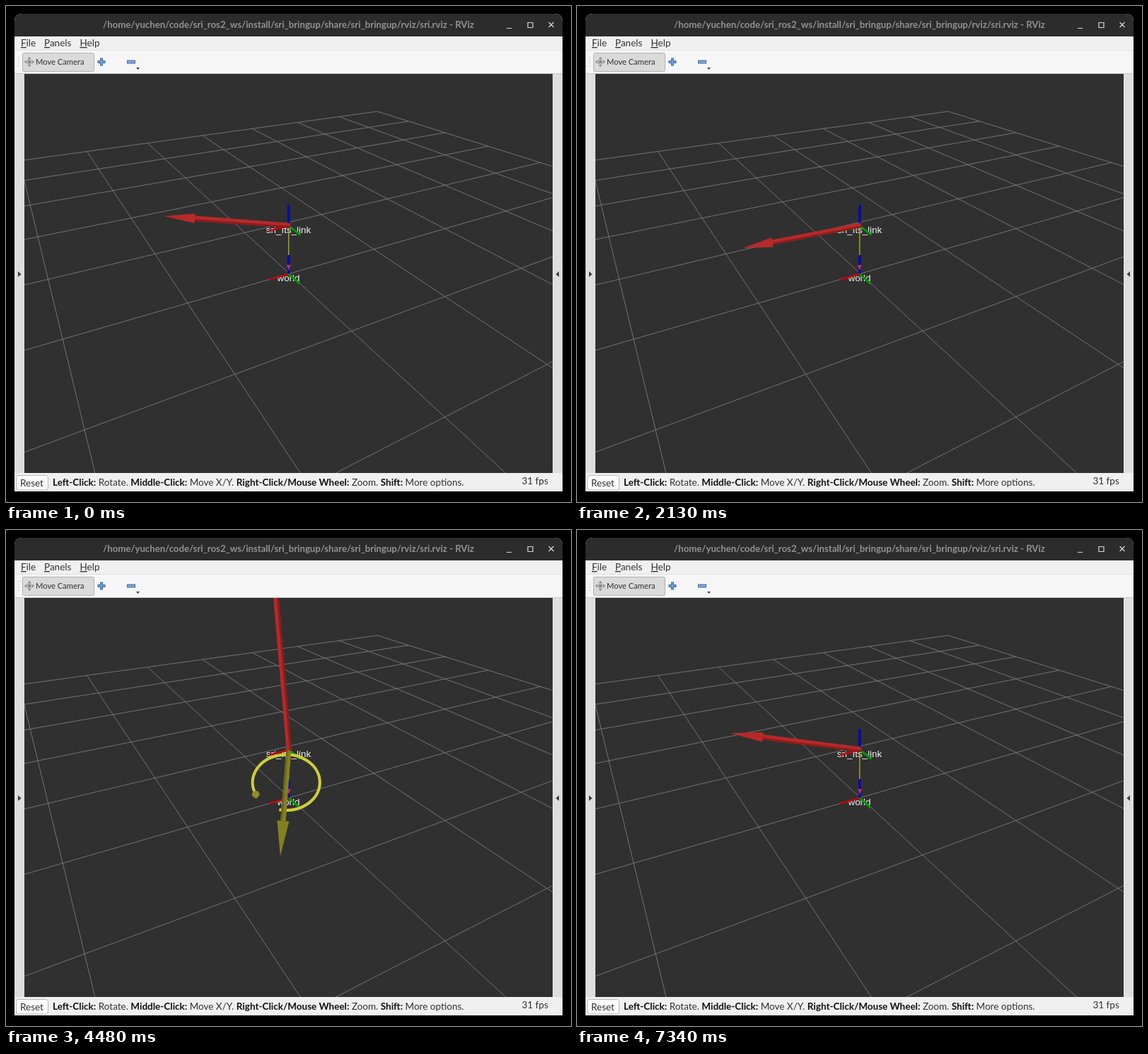
An HTML page that plays this animation: 799 px wide and 701 px high, repeating every 7380 ms.

```html
<!DOCTYPE html>
<html lang="en">
<head>
<meta charset="utf-8">
<title>Wrench display</title>
<style>
  html, body { margin: 0; width: 100%; height: 100%; overflow: hidden; background: #000; }
  svg { display: block; }
  text { font: 13.5px Lato, "Open Sans", sans-serif; fill: #303030; white-space: pre; }
  .b { font-weight: 700; fill: #111; }
  .title { font-size: 13.2px; font-weight: 700; fill: #929292; text-anchor: middle; }
  .tag { font: 13.4px "Liberation Sans", Arial, sans-serif; fill: #f2f2f2; text-anchor: middle; }
  .u { text-decoration: underline; }
  #grid { stroke: #7b7b7b; stroke-width: .9; fill: none; }
</style>
</head>
<body>
<svg width="799" height="701" viewBox="0 0 799 701">
  <defs><clipPath id="view"><rect x="26" y="96" width="747" height="564"/></clipPath></defs>
  <rect width="799" height="701"/>

  <!-- window and title bar -->
  <path d="M12 686V22Q12 11 23 11H776Q787 11 787 22V686Z" fill="#f0f0f0"/>
  <path d="M12 43V22Q12 11 23 11H776Q787 11 787 22V43Z" fill="#2c2c2c"/>
  <text class="title" x="399.5" y="31">/home/yuchen/code/sri_ros2_ws/install/sri_bringup/share/sri_bringup/rviz/sri.rviz - RViz</text>
  <path d="M708 31.5H715M738 23.5H745V30.5H738ZM767.5 23L774.5 30M774.5 23L767.5 30" fill="none" stroke="#d8d8d8" stroke-width="1.2"/>

  <!-- menu and toolbar -->
  <text x="21" y="57"><tspan class="u">F</tspan>ile</text>
  <text x="54" y="57"><tspan class="u">P</tspan>anels</text>
  <text x="104.5" y="57"><tspan class="u">H</tspan>elp</text>
  <rect x="12" y="62" width="775" height="33" fill="#f6f6f6"/>
  <path d="M12 62.5H787" stroke="#e0e0e0"/>
  <path d="M12 95.5H787" stroke="#c8c8c8"/>
  <path d="M18 72V88" stroke="#c4c4c4" stroke-width="2" stroke-dasharray="1 3"/>
  <rect x="23.5" y="66.5" width="101" height="26" rx="2" fill="#dadada" stroke="#b2b2b2"/>
  <path d="M33 73V85M27 79H39M31 75L33 72.5L35 75M31 83L33 85.5L35 83M29 77L26.5 79L29 81M37 77L39.5 79L37 81M30 76L36 82M36 76L30 82" fill="none" stroke="#777"/>
  <text x="42" y="83" style="font-size:11.2px">Move Camera</text>
  <path d="M135 73.5V84.5M129.5 79H140.5" stroke="#3e6fa8" stroke-width="4"/>
  <path d="M135 74.5V83.5M130.5 79H139.5" stroke="#7fa8d8" stroke-width="1.5"/>
  <rect x="171.5" y="77" width="11" height="4" fill="#7fa8d8" stroke="#3e6fa8"/>
  <path d="M184 87H189L186.5 90Z" fill="#444"/>

  <!-- side handles -->
  <path d="M12 96H26V660H12ZM773 96H787V660H773Z" fill="#dedede"/>
  <path d="M17 375L21.5 379L17 383ZM782 375L777.5 379L782 383Z" fill="#3c3c3c"/>

  <!-- 3D view -->
  <rect x="26" y="96" width="747" height="564" fill="#303030"/>
  <g clip-path="url(#view)">
    <path id="grid"/>
    <text class="tag" x="399.5" y="320.5">sri_fts_link</text>
    <text class="tag" x="399.5" y="388.5">world</text>
    <g fill="none" stroke-width="3">
      <path d="M399.7 312V352" stroke="#a3a026" stroke-width="1.5"/>
      <path d="M399.7 281V310M399.7 352V379" stroke="#0808b4" stroke-width="3.5"/>
      <path d="M372 318L400 311M372 386.5L400 379" stroke="#c00808" stroke-width="2.4"/>
      <path d="M400 311L416.5 323.5M400 379L415.5 392.5" stroke="#089408"/>
    </g>
    <path d="M397 366H402.5L399.7 374Z" fill="#c33262"/>
    <g id="torque">
      <path id="ring" fill="none" stroke="#cece38"/>
      <path id="cone" fill="#8f8d22"/>
      <path id="ts"/><path id="td"/><path id="th"/>
    </g>
    <path id="fs"/><path id="fd"/><path id="fh"/>
  </g>

  <!-- status bar -->
  <rect x="14.5" y="663.5" width="45" height="20.5" rx="3" fill="#fbfbfb" stroke="#b8b8b8"/>
  <text x="20" y="679">Reset</text>
  <text x="66" y="678"><tspan class="b">Left-Click:</tspan> Rotate. <tspan class="b">Middle-Click:</tspan> Move X/Y. <tspan class="b">Right-Click/Mouse Wheel:</tspan> Zoom. <tspan class="b">Shift:</tspan> More options.</text>
  <text x="729.5" y="676">31 fps</text>
  <path d="M778 683H785M781 680H785M784 677H785" stroke="#cfcfcf" stroke-dasharray="1 2"/>
</svg>
<script>
const $ = id => document.getElementById(id);
const LOOP = 7380, BASE = [400, 310], RAD = Math.PI / 180;

// Key points: time, then tip of the force arrow relative to its base
const force = [[0, -177, -13], [1300, -171, -10], [2100, -165, 32], [2610, 56, -148],
  [3400, 300, -340], [3900, 70, -330], [4480, -28, -331], [5400, -50, -310],
  [5700, -200, -215], [6400, -187, -40], [7300, -183, -23]];

// Key points: time, then torque size; negative points up, away from the viewer
const torque = [[0, 0], [2500, 0], [3100, -.9], [3400, -1], [3700, -.97], [4050, 0],
  [4480, .755], [5350, 1], [5600, .43], [6300, 0]];

const UP = { x: 56, y: -291, at: .5, rx: 92.5, ry: 39.5, tilt: 10, head: .25, w: 9.5,
  light: '#97962a', dark: '#77751f' };
const DOWN = { x: -16, y: 200, at: .31, rx: 63, ry: 52, tilt: 0, head: .33, w: 7.5,
  light: '#838020', dark: '#69671a' };

// The picture refreshes more slowly while the torque is shown
function snap(t) {
  const [from, step] = t >= 2680 && t < 6350 ? [2680, 90] : [0, 50];
  return from + Math.floor((t - from) / step) * step;
}

function pose(keys, t) {
  const i = keys.findIndex(k => k[0] > t);
  if (i < 0) return keys[keys.length - 1].slice(1);
  const p = keys[i - 1], q = keys[i], f = (t - p[0]) / (q[0] - p[0]);
  return p.slice(1).map((v, j) => v + (q[j + 1] - v) * f);
}

const poly = pts => 'M' + pts.map(p => p.map(v => v.toFixed(2)).join(' ')).join('L') + 'Z';

function paint(id, d, fill) {
  $(id).setAttribute('d', d);
  $(id).setAttribute('fill', fill);
}

// Local frame: d along the direction (x, y), o to its side
function frame([ox, oy], x, y) {
  const n = Math.hypot(x, y) || 1, ux = x / n, uy = y / n;
  return (d, o) => [ox + ux * d - uy * o, oy + uy * d + ux * o];
}

// Two-tone shaft and head; w is the shaft width at the neck
function arrow(id, x, y, head, w, hw, light, dark) {
  const len = Math.hypot(x, y), neck = len * (1 - head), a = 3.5, b = w / 2;
  const local = frame(BASE, x, y), side = x < -.3 * len ? -1 : 1;
  const at = (d, o) => local(d, o * side);
  paint(id + 's', poly([at(-2, -a), at(neck, -b), at(neck, b), at(-2, a)]), light);
  paint(id + 'd', poly([at(-2, a * .25), at(neck, b * .25), at(neck, b), at(-2, a)]), dark);
  paint(id + 'h', poly([at(neck, -hw), at(len, 0), at(neck, hw)]), light);
}

function drawRing(cx, cy, rx, ry, tilt) {
  const c = Math.cos(tilt * RAD), s = Math.sin(tilt * RAD);
  const on = deg => {
    const x = rx * Math.cos(deg * RAD), y = ry * Math.sin(deg * RAD);
    return [cx + x * c - y * s, cy + x * s + y * c];
  };
  const end = on(155), h = 2 + rx * .075;
  $('ring').setAttribute('d', `M${on(102)}A${rx} ${ry} ${tilt} 1 0 ${end}`);
  $('ring').setAttribute('stroke-width', 3 + rx * .025);
  const at = frame(end, .1, 1);
  $('cone').setAttribute('d', poly([at(-h * .8, -h * .6), at(0, -h), at(h * .5, -h * .8), at(h * 1.2, 0),
    at(h * .5, h * .8), at(0, h), at(-h * .8, h * .6)]));
}

const mix = (a, b, f) => `rgb(${a.map((v, i) => Math.round(v + (b[i] - v) * f))})`;

function draw(t) {
  const [fx, fy] = pose(force, t);
  const shade = Math.min(1, Math.max(0, (fx + 28) / 200));
  const w = 7 + Math.hypot(fx, fy) * (.002 + .011 * shade);
  arrow('f', fx, fy, .25, w, w * .93,
    mix([182, 41, 41], [102, 26, 26], shade), mix([139, 28, 28], [70, 18, 18], shade));

  const [size] = pose(torque, t), s = Math.abs(size), k = size < 0 ? UP : DOWN;
  $('torque').style.display = s < .02 ? 'none' : '';
  if (s < .02) return;
  const x = k.x * s, y = k.y * s;
  drawRing(BASE[0] + x * k.at, BASE[1] + y * k.at, k.rx * s, k.ry * s, k.tilt);
  arrow('t', x, y, k.head, k.w, 8.5, k.light, k.dark);
}

// Perspective of the 10 by 10 ground grid
function drawGrid() {
  const depth = (u, v) => 1 - .0405 * u - .0724 * v;
  const at = (u, v) => [525 - 73.05 * u + 2.95 * v, 149 + 1.1 * u + 2.05 * v].map(p => p / depth(u, v));
  let d = '';
  for (let i = 0; i <= 10; i++) {
    d += `M${at(i, 0)}L${at(i, Math.min(10, (depth(i, 0) - .05) / .0724))}`;
    d += `M${at(0, i)}L${at(Math.min(10, (depth(0, i) - .05) / .0405), i)}`;
  }
  $('grid').setAttribute('d', d);
}

drawGrid();
const start = performance.now();
function tick() {
  draw(snap((performance.now() - start) % LOOP));
  requestAnimationFrame(tick);
}
tick();
</script>
</body>
</html>
```
